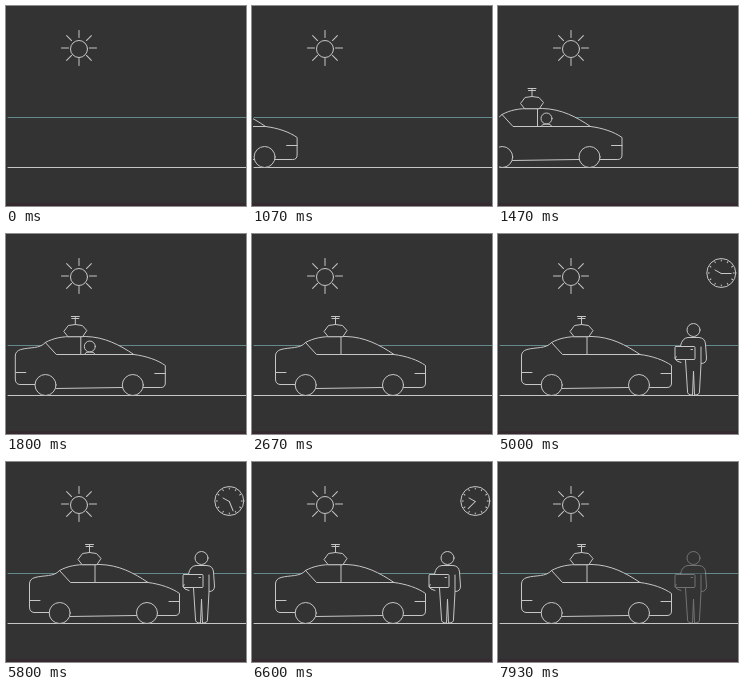
Write an HTML page that moves like this. It is 240 px wide and 200 px high and loops after 8 s.

```html
<!DOCTYPE html>
<html>
<head>
<meta charset="utf-8">
<style>
html, body { margin: 0; width: 100%; height: 100%; overflow: hidden; background: #333; }
svg { display: block; width: 240px; height: 200px; }
.ink { fill: none; stroke: #c6c6c6; stroke-width: 1; stroke-linejoin: round; stroke-linecap: round; }
.solid { fill: #333; }
</style>
</head>
<body>
<svg viewBox="0 0 240 200" class="ink">
  <clipPath id="stage"><rect x="1" width="239" height="200"/></clipPath>
  <rect y="197" width="240" height="3" fill="#342a30" stroke="none"/>
  <path d="M2 111.5H240" stroke="#64898c"/>
  <path d="M2 161.5H240"/>

  <circle cx="73" cy="43" r="8.5"/>
  <g id="rays"></g>

  <g clip-path="url(#stage)">
    <g id="car">
      <path class="solid" d="M43 150.5H28Q23.5 150 23.5 145V122Q23.5 117 29 115.5C38 113 48 115 53.5 108.5
        C62 104 70 102.5 82 102.5H94C113 103 128 111 142 120.5C154 122 166 126 173.5 131.5V149Q173.5 153.5 169 153.5H151.5
        L130.5 153.5L64 154.5Z" stroke="none"/>
      <path d="M43 150.5H28Q23.5 150 23.5 145V122Q23.5 117 29 115.5C38 113 48 115 53.5 108.5
        C62 104 70 102.5 82 102.5H94C113 103 128 111 142 120.5C154 122 166 126 173.5 131.5V149Q173.5 153.5 169 153.5H151.5
        M64 154.5L130.5 153.5"/>
      <path d="M53.5 108.5L64.5 120.5H142M89 102.5V120.5M24 138.5H34M163 139.5H173.5"/>
      <circle class="solid" cx="53.7" cy="151" r="10.5"/>
      <circle class="solid" cx="141" cy="151" r="10.5"/>
      <path class="solid" d="M76 102.5L72 97.5L76.5 91.5Q83.5 89.5 90.5 91.5L95 96.5L91 102.5Z"/>
      <path d="M83.5 90.5V83M79.5 82.5H87.5M80 84.5H87"/>
      <g id="driver">
        <circle cx="98" cy="112.5" r="5.5"/>
        <path d="M92.5 120.5Q93.5 117.5 98 118Q102.5 117.5 103.5 120.5"/>
      </g>
    </g>
  </g>

  <g id="person">
    <path class="solid" d="M187.5 126L190 160.5H201.500L203.500 129.500Q208.500 130 208.500 124L207.500 110Q207 104 201 103.500H190
      Q184 104 182.500 112V126Z" stroke="none"/>
    <path d="M182.500 112Q184 104 190 103.500H201Q207 104 207.500 110L208.500 124Q208.500 129.500 203.500 129.500
      M203 113V130L201.500 157Q202 161 196.500 161L195.500 137L194.500 161Q189 161 189.500 157L187.500 126"/>
    <circle class="solid" cx="195.500" cy="96" r="6.500"/>
    <rect class="solid" x="177" y="112.500" width="20" height="13" rx="1"/>
    <path d="M193 115.500H194.500M178 122.500Q176 125 179 127L183 128.500"/>
  </g>

  <g id="clock">
    <circle class="solid" cx="223.300" cy="39" r="14.500"/>
    <g id="ticks"></g>
    <path d="M223.300 39.500L217 36"/>
    <path id="hand" d="M223.300 39.500V29.500"/>
  </g>
</svg>
<script>
const $ = id => document.getElementById(id);
const clamp = v => Math.min(1, Math.max(0, v));
const ramp = (t, from, to) => clamp((t - from) / (to - from));
const easeInOut = p => p < .5 ? 4 * p ** 3 : 1 - 4 * (1 - p) ** 3;

// Evenly spaced radial strokes around a centre
function spokes(id, count, x, y, inner, outer) {
  for (let i = 0; i < count; i++)
    $(id).innerHTML += `<path d="M${x} ${y - inner}V${y - outer}" transform="rotate(${i * 360 / count} ${x} ${y})"/>`;
}
spokes('rays', 8, 73, 42, 10.5, 17.5);
spokes('ticks', 12, 223.3, 39, 12, 13);

const show = (id, alpha) => $(id).setAttribute('opacity', alpha);

function draw(now) {
  const t = now % 8000;
  const shift = -188 * (1 - easeInOut(ramp(t, 40, 2440)));
  $('car').setAttribute('transform', `translate(${shift} 0)`);
  show('driver', 1 - ramp(t, 2330, 2670));
  show('person', ramp(t, 3070, 3470) - .85 * ramp(t, 7730, 8030));
  show('clock', ramp(t, 3740, 4130) - ramp(t, 7335, 7530));
  $('hand').setAttribute('transform', `rotate(${270 * ramp(t, 3930, 7130)} 223.3 39.5)`);
  requestAnimationFrame(draw);
}
draw(performance.now());
</script>
</body>
</html>
```
